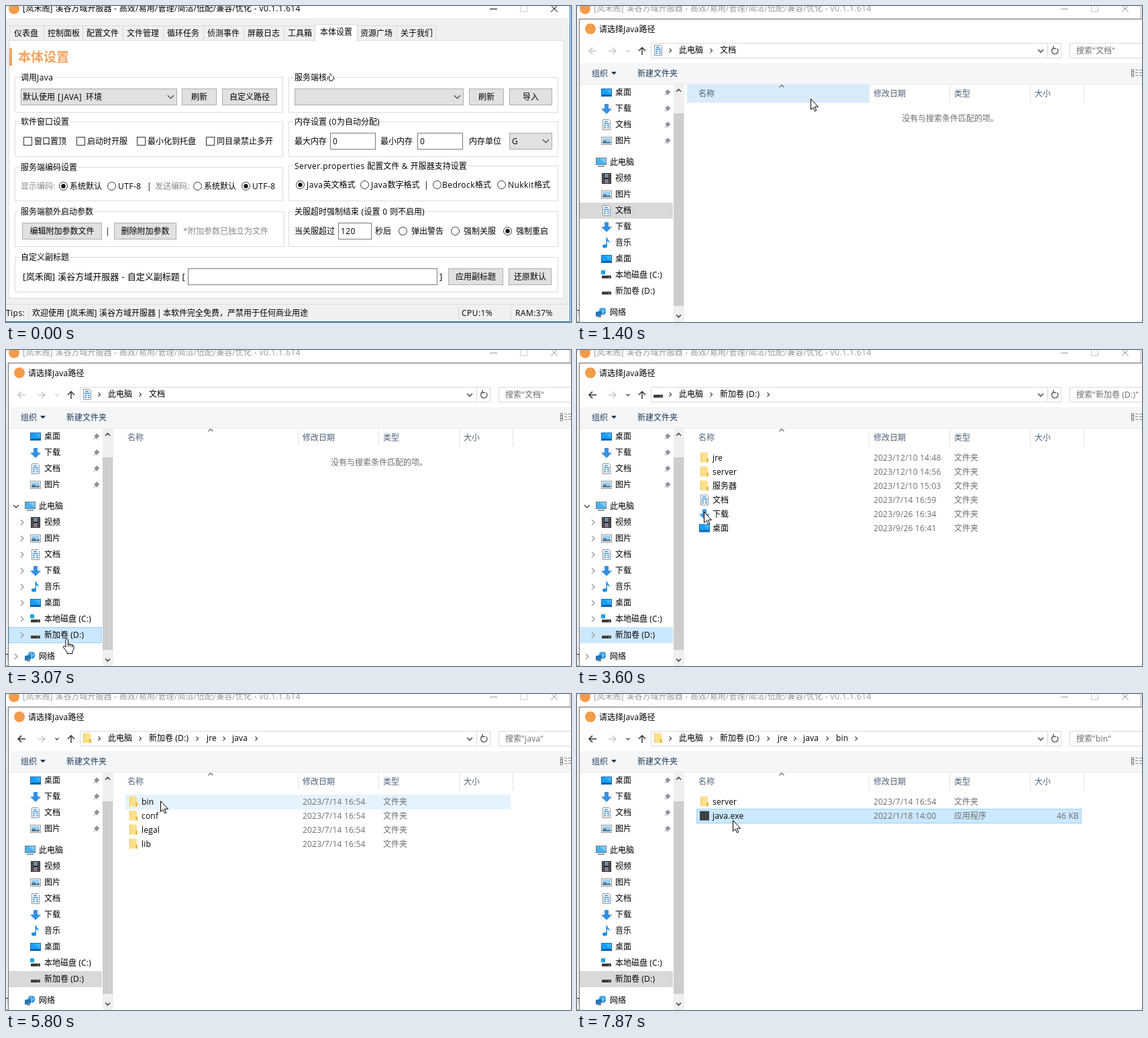
An HTML page for the animation above (8 s loop, 842x471 px).

```html
<!DOCTYPE html>
<html lang="zh-CN">
<head>
<meta charset="utf-8">
<title>本体设置</title>
<style>
html, body { margin: 0; width: 100%; height: 100%; overflow: hidden; background: #fff; }
svg { display: block; width: 842px; height: 471px; }
text { font: 12px "Open Sans", "Noto Sans CJK SC", "Noto Sans CJK", sans-serif; }
.main tspan { letter-spacing: .45px; }
.dialog tspan { letter-spacing: .2px; }
.head { font-size: 19px; font-weight: 700; }
.large { font-size: 13px; }
.mid { text-anchor: middle; }
.end { text-anchor: end; }
</style>
</head>
<body>
<svg id="stage" viewBox="0 0 842 471"></svg>
<script>
const stage = document.getElementById('stage');
const BRAND = '[岚禾阁]', APP = '溪谷方域开服器', ORANGE = '#f29c4b';

// ---------- drawing helpers ----------
const text = (x, y, s, fill = '#000', cls = '') =>
  `<text x="${x}" y="${y}" fill="${fill}" class="${cls}">` +
  s.replace(/&/g, '&amp;').replace(/[\x20-\x7e]+/g, '<tspan>$&</tspan>') + '</text>';
const fill = (x1, y1, x2, y2, color) =>
  `<rect x="${x1}" y="${y1}" width="${x2 - x1}" height="${y2 - y1}" fill="${color}"/>`;
const box = (x1, y1, x2, y2, color, line) =>
  `<rect x="${x1 + .5}" y="${y1 + .5}" width="${x2 - x1 - 1}" height="${y2 - y1 - 1}" fill="${color}" stroke="${line}"/>`;
const line = (d, color, w = 1) => `<path d="${d}" fill="none" stroke="${color}" stroke-width="${w}"/>`;
const shape = (d, color, edge = 'none') => `<path d="${d}" fill="${color}" stroke="${edge}"/>`;
const dot = (x, y, r, color) => `<circle cx="${x}" cy="${y}" r="${r}" fill="${color}"/>`;
const at = (x, y, s) => `<g transform="translate(${x} ${y})">${s}</g>`;
const down = (x, y, r, color, w = 1.2) => line(`M${x - r} ${y - r / 2}l${r} ${r} ${r} ${-r}`, color, w);
const up = (x, y, r, color, w = 1.2) => line(`M${x - r} ${y + r / 2}l${r} ${-r} ${r} ${r}`, color, w);
const right = (x, y, r, color, w = 1.2) => line(`M${x - r / 2} ${y - r}l${r} ${r} ${-r} ${r}`, color, w);

// ---------- settings window ----------
const button = (x1, y, x2, s, hot) =>
  box(x1, y, x2, y + 25, hot ? '#e5f1fb' : '#e1e1e1', hot ? '#0078d7' : '#adadad') +
  text((x1 + x2) / 2, y + 17, s, '#000', 'mid');
const combo = (x1, y, x2) => box(x1, y, x2, y + 25, '#e1e1e1', '#adadad') + down(x2 - 9.5, y + 12.5, 4.5, '#444');
const entry = (x1, y, x2, s = '') => box(x1, y, x2, y + 25, '#fff', '#7a7a7a') + text(x1 + 4, y + 17, s);
const check = (x, s) => box(x, 195, x + 13, 208, '#fff', '#333') + text(x + 16, 206, s);
const radio = (x, y, on, tx, s) => at(x + .5, y + .5,
  '<circle r="6" fill="#fff" stroke="#333"/>' + (on ? dot(0, 0, 3.2, '#111') : '')) + text(tx, y + 5, s);
const group = (x1, y1, x2, y2, s, end) =>
  box(x1, y1, x2, y2, 'none', '#dcdcdc') + fill(x1 + 7, y1 - 1, end + 2, y1 + 2, '#fff') + text(x1 + 9, y1 + 4.5, s);

const tabs = [[5, '仪表盘'], [56, '控制面板'], [114, '配置文件'], [174, '文件管理'], [234, '循环任务'], [294, '侦测事件'],
  [354, '屏蔽日志'], [414, '工具箱'], [461, '本体设置'], [522, '资源广场'], [582, '关于我们'], [640]];

function mainWindow(active, hot, cpu) {
  const ink = active ? '#000' : '#999';
  let s = fill(0, 0, 842, 471, '#f0f0f0') + fill(0, 0, 842, 18, '#fff') + fill(841, 0, 842, 471, '#fff');
  s += dot(12, 4, 8, ORANGE);
  s += text(25, 8, `${BRAND} ${APP} - 高效/易用/管理/简洁/低配/兼容/优化 - v0.1.1.614`, ink);
  s += line('M721 4.5h11', ink) + box(766, -2, 777, 9, 'none', '#ccc') + line('M812 -1l10 10m0 -10l-10 10', ink);

  tabs.slice(0, -1).forEach(([x, name], i) => {
    if (i !== 8) s += box(x, 29, tabs[i + 1][0] + 1, 52, '#f0f0f0', '#d9d9d9') + text(i ? x + 6 : 12, 45, name);
  });
  s += box(4, 51, 832, 436, '#fff', '#dcdcdc') + box(460, 27, 524, 54, '#fff', '#d9d9d9') + fill(461, 51, 523, 55, '#fff');
  s += text(468, 43, '本体设置');
  s += fill(5, 63, 9, 89, '#f4a460') + text(18, 83, '本体设置', '#f4a460', 'head');

  s += group(13, 106, 413, 159, '调用Java', 71) + combo(22, 123, 255);
  s += text(25, 140, '默认使用') + text(77, 140, '[JAVA]') + text(119, 140, '环境');
  s += button(262, 123, 314, '刷新') + button(322, 123, 404, '自定义路径', hot);
  s += group(421, 106, 823, 159, '服务端核心', 490) + combo(430, 123, 682);
  s += button(690, 123, 742, '刷新') + button(750, 123, 814, '导入');

  s += group(13, 172, 413, 225, '软件窗口设置', 94);
  s += check(26, '窗口置顶') + check(105, '启动时开服') + check(195, '最小化到托盘') + check(298, '同目录禁止多开');
  s += group(421, 172, 823, 225, '内存设置 (0为自动分配)', 557);
  s += text(430, 206, '最大内存') + entry(483, 189, 551, '0') + text(558, 206, '最小内存') + entry(613, 189, 681, '0');
  s += text(690, 206, '内存单位') + combo(750, 189, 814) + text(754, 206, 'G');

  s += group(13, 240, 413, 291, '服务端编码设置', 106);
  s += text(22, 273, '显示编码:', '#888') + radio(85, 268, 1, 95, '系统默认') + radio(157, 268, 0, 167, 'UTF-8');
  s += text(210, 273, '|') + text(222, 273, '发送编码:', '#888');
  s += radio(285, 268, 0, 295, '系统默认') + radio(357, 268, 1, 367, 'UTF-8');
  s += group(421, 238, 823, 291, 'Server.properties 配置文件 & 开服器支持设置', 685);
  s += radio(438, 266, 1, 448, 'Java英文格式') + radio(534, 266, 0, 544, 'Java数字格式') + text(623, 271, '|');
  s += radio(642, 266, 0, 650, 'Bedrock格式') + radio(738, 266, 0, 748, 'Nukkit格式');

  s += group(13, 306, 415, 359, '服务端额外启动参数', 130);
  s += button(24, 323, 143, '编辑附加参数文件') + text(148, 340, '|') + button(161, 323, 254, '删除附加参数');
  s += text(264, 340, '*附加参数已独立为文件', '#888');
  s += group(421, 306, 823, 359, '关服超时强制结束 (设置 0 则不启用)', 625);
  s += text(430, 340, '当关服超过') + entry(495, 323, 545, '120') + text(550, 340, '秒后');
  s += radio(591, 335, 0, 604, '弹出警告') + radio(669, 335, 0, 682, '强制关服') + radio(747, 335, 1, 760, '强制重启');

  s += group(13, 374, 823, 427, '自定义副标题', 94);
  s += text(25, 408, `${BRAND} ${APP} - 自定义副标题 [`, '#000', 'large') + entry(271, 391, 643) + text(646, 408, ']', '#000', 'large');
  s += button(659, 391, 741, '应用副标题') + button(749, 391, 813, '还原默认');

  s += line('M0 444.5h840M33.5 448v20M674.5 448v20M752.5 448v20', '#dcdcdc');
  s += text(0, 462, 'Tips:') + text(39, 462, '欢迎使用') + text(91, 462, BRAND) + text(139, 462, APP);
  s += text(225, 462, '|') + text(234, 462, '本软件完全免费，严禁用于任何商业用途');
  s += text(679, 462, `CPU:${cpu}%`) + text(759, 462, 'RAM:37%');
  s += line('M840.5 0V470.5H0', active ? '#0078d7' : '#aaa');
  return `<g class="main">${s}</g>`;
}

// ---------- icons, each in a 16 by 16 cell ----------
const drive = shape('M2 8h12l1 2H1z', '#b8b8b8') + fill(1, 9, 15, 13, '#3c3c3c') + fill(11, 11, 13, 12, '#8fe08f');
const icon = {
  desk: box(0, 2, 16, 14, '#18a0fb', '#1469b0') + fill(1, 11, 15, 13, '#0b5fa8') + shape('M6 3h9v8z', '#39b4ff'),
  down: shape('M5 1h6v7h5l-8 8-8-8h5z', '#3590e4'),
  doc: shape('M2.5 .5h9l2 2v13h-11z', '#fff', '#8b9299') + line('M5 3.5h5M4 6.5h8M4 9.5h3m2 0h3M4 12.5h3m2 0h3', '#2f86cf', 1.5),
  pic: box(0, 2, 16, 14, '#fff', '#909090') + fill(2, 4, 14, 12, '#9ad0f5') + shape('M2 12V9l4-2 3 3 5-1v3z', '#557a94'),
  pc: box(0, 1, 16, 12, '#4bb2ef', '#667d8c') + shape('M6 2h9v8z', '#7accf8') + fill(3, 13, 13, 15, '#8ba0ae'),
  video: fill(1, 0, 15, 16, '#2a2a2a') + fill(5, 1, 11, 7, '#6b8ea8') + fill(5, 9, 11, 15, '#8a7a90') +
    line('M3 1v14M13 1v14', '#ddd').replace('/>', ' stroke-dasharray="1.5 1.5"/>'),
  music: '<ellipse cx="5.5" cy="13" rx="3.5" ry="2.7" fill="#1c8fe0"/>' + shape('M7.5 0H9c0 4 5 4 3.5 9-.5-3-2-3-3.5-3.5V13H7.5z', '#1c8fe0'),
  drive,
  sys: fill(0, 1, 6, 7, '#20a4dc') + drive,
  net: dot(10, 6, 5.5, '#3c9be0') + line('M5 5q5 3 10 0M10 1v10', '#a5d5f5') + shape('M0 7l9-2v7l-9 2z', '#2277b8') + fill(3, 13, 8, 15, '#777'),
  folder: shape('M2 0h9l2 1v14H2z', '#ffe08a') + shape('M11 9h3v6h-3z', '#e9bd4c') + line('M2.5 0v15', '#ecc75c'),
  exe: fill(1, 1, 15, 15, '#3d4248')
};

// ---------- file dialog ----------
const tree = [['desk', '桌面'], ['down', '下载'], ['doc', '文档'], ['pic', '图片'], ['pc', '此电脑'], ['video', '视频'], ['pic', '图片'],
  ['doc', '文档'], ['down', '下载'], ['music', '音乐'], ['desk', '桌面'], ['sys', '本地磁盘 (C:)'], ['drive', '新加卷 (D:)'], ['net', '网络']]
  .map(([ic, name], i) => ({ ic, name, y: 129 + 24 * i + (i > 3 ? 8 : 0) + (i > 12 ? 8 : 0), root: i === 4 || i === 13 }));
const DOCS = 7, DISK = 12;

const old = '2023/7/14 16:54', dir = '文件夹';
const folders = {
  docs: { ic: 'doc', path: ['文档'], find: '文档', rows: [] },
  disk: { ic: 'drive', path: ['新加卷 (D:)'], find: '新加卷 (D:)', rows: [
    ['folder', 'jre', '2023/12/10 14:48', dir], ['folder', 'server', '2023/12/10 14:56', dir],
    ['folder', '服务器', '2023/12/10 15:03', dir], ['doc', '文档', '2023/7/14 16:59', dir],
    ['down', '下载', '2023/9/26 16:34', dir], ['desk', '桌面', '2023/9/26 16:41', dir]] },
  jre: { ic: 'folder', path: ['新加卷 (D:)', 'jre'], find: 'jre', rows: [['folder', 'java', old, dir]] },
  java: { ic: 'folder', path: ['新加卷 (D:)', 'jre', 'java'], find: 'java',
    rows: ['bin', 'conf', 'legal', 'lib'].map(f => ['folder', f, old, dir]) },
  bin: { ic: 'folder', path: ['新加卷 (D:)', 'jre', 'java', 'bin'], find: 'bin', rows: [
    ['folder', 'server', old, dir], ['exe', 'java.exe', '2022/1/18 14:00', '应用程序', '46 KB']] }
};
const crumbX = [213, 299, 337, 386], crumbEnd = [285, 325, 373, 416];

// step at which each folder opens, and when its last path arrow shows
const visits = [['docs', 20, 999], ['disk', 47, 50], ['jre', 68, 73], ['java', 84, 87], ['bin', 105, 108]];
// selected rows: from step, to step, row
const picks = [[66, 68, 0], [81, 84, 0], [102, 105, 0], [118, 999, 1]];

function toolbar(f, name, arrowOn) {
  const back = name === 'docs' ? '#c8c8c8' : '#333';
  let s = dot(20, 34, 8, ORANGE) + text(33, 39, '请选择Java路径');
  s += line('M29 67H18m5 -5l-5 5 5 5', back, 1.6) + line('M47 67h11m-5 -5l5 5-5 5', '#c8c8c8', 1.6);
  s += down(76, 67, 2.5, back) + line('M97 73V62m-5 5l5 -5 5 5', '#444', 1.6);
  s += box(110, 55, 722, 78, '#fff', '#d9d9d9') + line('M701.5 55v23', '#d9d9d9') + down(691, 67, 4, '#444', 1.5);
  s += line('M715.5 63.5a4.7 4.7 0 1 1 -5 -1M710 59.5v4h4', '#555', 1.4);
  s += at(113, 58, icon[f.ic]) + right(139, 66.5, 3, '#444') + text(152, 70, '此电脑') + right(200, 66.5, 3, '#444');
  f.path.forEach((p, i) => {
    s += text(crumbX[i], 70, p);
    if (i < f.path.length - 1 || arrowOn) s += right(crumbEnd[i], 66.5, 3, '#444');
  });
  s += box(734, 55, 850, 78, '#fff', '#d9d9d9') + text(744, 71, `搜索"${f.find}"`, '#6d6d6d');
  s += fill(4, 85, 842, 116, '#f5f6f7') + line('M4 116.5h838', '#e8e9ea');
  s += text(22, 105, '组织', '#1e395b') + shape('M51 98h8l-4 4.5z', '#1e395b') + text(90, 105, '新建文件夹', '#1e395b');
  for (let y = 94; y < 105; y += 4) s += box(826, y, 830, y + 4, '#fff', '#888') + line(`M832 ${y + 1.5}h4m2 0h4`, '#888');
  return s;
}

function navPane(n, hover) {
  const fade = n < 50 ? Math.min(1, Math.max(0, .12 + .3 * (n - 32))) : Math.max(0, Math.min(1, (69 - n) / 3));
  const bar = (i, color, edge) => edge ? box(4, tree[i].y - 12, 143, tree[i].y + 12, color, edge)
    : fill(4, tree[i].y - 12, 143, tree[i].y + 12, color);
  let s = '', arrows = '';
  if (hover >= 0) s += bar(hover, '#e5f3ff');
  if (n < 46) s += bar(DOCS, '#d9d9d9');
  else s += bar(DISK, n < 68 ? '#cce8ff' : '#d9d9d9', n < 51 && '#99d1ff');
  tree.forEach((r, i) => {
    const x = r.root ? 28 : 36;
    s += at(x, r.y - 8, icon[r.ic]) + text(x + 21, r.y + 4, r.name);
    if (i < 4) s += at(135, r.y, shape('M0 -5l5 5-2 .5-2 2 .2 2-2.5 -2.5L-5 5l3 -4.5-2.5 -2.5 2 .2 2-2z', '#8c939b'));
    else arrows += i === 4 ? down(15, r.y, 4, '#444', 1.4) : right(r.root ? 15 : 24, r.y, 4, '#999', 1.4);
  });
  s += `<g opacity="${fade}">${arrows}</g>`;
  s += fill(144, 117, 160, 471, '#f0f0f0') + fill(144, 160, 159, 447, '#cdcdcd');
  return s + up(151.5, 126, 3.5, '#444', 1.6) + down(151.5, 462, 3.5, '#444', 1.6);
}

function fileList(f, picked, hover, headHot) {
  let s = headHot ? fill(164, 117, 435, 144, '#d9ebf9') : '';
  s += up(305, 119.5, 3.5, '#666') + line('M435.5 117v27M555.5 117v27M675.5 117v27M755.5 117v27', '#e5e5e5');
  [[181, '名称'], [442, '修改日期'], [562, '类型'], [682, '大小']].forEach(([x, h]) => s += text(x, 135, h, '#4c607a'));
  if (!f.rows.length) s += text(484, 172, '没有与搜索条件匹配的项。', '#6d6d6d');
  f.rows.forEach(([ic, name, date, kind, size = ''], i) => {
    const y = 150 + 21 * i;
    if (i === picked) s += box(178, y, 752, y + 22, '#cce8ff', '#99d1ff');
    else if (i === hover) s += fill(178, y, 752, y + 22, '#e5f3ff');
    s += at(182, y + 2.5, icon[ic]) + text(202, y + 15, name) + text(442, y + 15, date, '#6d6d6d');
    s += text(562, y + 15, kind, '#6d6d6d') + text(748, y + 15, size, '#6d6d6d', 'end');
  });
  return s;
}

function dialog(n) {
  const [name, , arrowAt] = visits.filter(v => n >= v[1]).pop();
  const f = folders[name], [x, y] = pointer(n - 1);
  const pick = picks.find(p => n >= p[0] && n < p[1]);
  const row = x > 178 && y >= 150 ? Math.floor((y - 150) / 21) : -1;
  const node = n < 46 && x < 143 ? tree.findIndex(r => Math.abs(r.y - y) <= 12) : -1;
  let s = box(3, 19, 850, 480, '#fff', '#707070') + toolbar(f, name, n >= arrowAt);
  if (n > 20) s += fileList(f, pick ? pick[2] : -1, row, n < 27) + navPane(n, node);
  return `<g class="dialog">${s}</g>`;
}

// ---------- pointer: step, x, y ----------
const path = [[3, 571, 421], [8, 400, 205], [12, 348, 138], [24, 348, 138], [31, 141, 238], [32, 117, 271], [35, 98, 385],
  [37, 90, 424], [38, 91, 430], [49, 91, 430], [53, 175, 270], [57, 230, 153], [59, 230, 153], [60, 230, 159],
  [110, 230, 159], [115, 232, 188]];
function pointer(n) {
  const i = path.findIndex(p => p[0] >= n);
  if (i < 0) return path[path.length - 1].slice(1);
  if (i === 0) return path[0].slice(1);
  const [a, ax, ay] = path[i - 1], [b, bx, by] = path[i], k = (n - a) / (b - a);
  return [Math.round(ax + (bx - ax) * k), Math.round(ay + (by - ay) * k)];
}
const arrow = shape('M.5 .5V16.5L4 13.2 6.5 18.8 8.8 17.8 6.3 12.3H11.5Z', '#fff', '#000');
const hand = shape('M-2 2Q-.5 -1 1.5 2V8L8 9.5Q10 10 10 12V16L8 19V22.5H0V20L-5.5 13.5Q-6 10.5 -3.5 11.5L-2 13Z', '#fff', '#000') +
  line('M1.5 8v4M4.5 9v3M7.5 10v3', '#000');

function cursor(n) {
  if (n < 3) return '';
  const [x, y] = pointer(n);
  return at(x, y, n >= 38 && n < 52 ? hand : arrow);
}

// ---------- clock: 15 steps a second, 8 s loop ----------
let shown = -1;
function tick(now) {
  const n = Math.min(119, Math.floor((now % 8000 + 5) * 15 / 1000));
  if (n !== shown) {
    shown = n;
    stage.innerHTML = mainWindow(n < 18, n >= 17, n < 18 ? 1 : 0) + (n >= 20 ? dialog(n) : '') + cursor(n);
  }
  requestAnimationFrame(tick);
}
tick(0);
</script>
</body>
</html>
```
